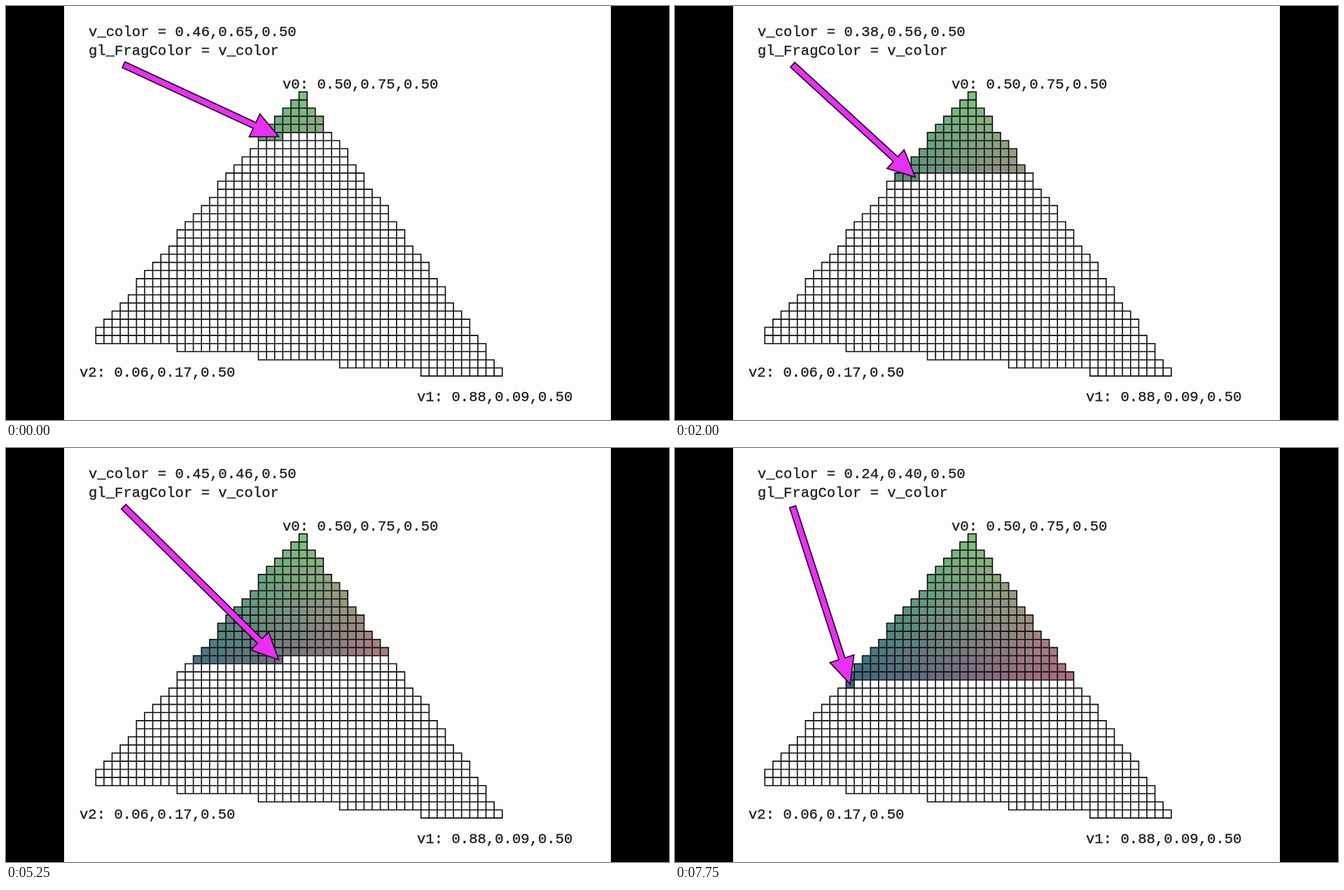
Write an HTML page with a canvas that moves like this. It is 947 px wide and 592 px high and loops after 8 s.

```html
<!DOCTYPE html>
<html lang="en">
<head>
<meta charset="utf-8">
<title>Varying interpolation</title>
<style>
  html, body { margin: 0; width: 100%; height: 100%; overflow: hidden; background: #000; }
  canvas { display: block; }
</style>
</head>
<body>
<canvas id="stage" width="947" height="592"></canvas>
<script>
const ctx = document.getElementById('stage').getContext('2d');

const LOOP = 8000;
const STEP = 250;
const CELL = 11.61;
const LEFT = 128.3;
const TOP = 122.8;
const ROWS = 35;
const ARROW_START = { x: 168, y: 84 };

// [step, index of the cell being shaded]
const PACE = [[0, 22], [5, 58], [12, 112], [16, 145], [21, 187], [25, 217], [31, 255]];

// Interpolate the vertex colours with barycentric weights.
function shade(col, row) {
  const dx = col + 0.5 - 25;
  const dy = row + 0.25;
  const a = (30 * dx + 25 * dy) / 1625;
  const b = (25 * dy - 35 * dx) / 1625;
  return [0.5025 + 0.378 * a - 0.4445 * b, 0.754 - 0.66 * a - 0.58 * b, 0.5];
}

function buildCells() {
  const cells = [];
  for (let row = 0; row < ROWS; row++) {
    const first = row <= 30 ? 25 - Math.ceil(row * 5 / 6) : (row - 30) * 10;
    const end = 26 + Math.floor(row * 5 / 7);
    for (let col = first; col < end; col++) {
      cells.push({ x: LEFT + col * CELL, y: TOP + row * CELL, color: shade(col, row) });
    }
  }
  return cells;
}

const cells = buildCells();

function cellIndexAt(step) {
  let k = 1;
  while (k < PACE.length - 1 && step > PACE[k][0]) k++;
  const [s0, i0] = PACE[k - 1];
  const [s1, i1] = PACE[k];
  return Math.round(i0 + (i1 - i0) * (step - s0) / (s1 - s0));
}

function drawGrid(current) {
  cells.forEach((cell, i) => {
    ctx.fillStyle = i <= current
      ? `rgb(${cell.color.map(v => Math.round(v * 255)).join(',')})`
      : '#fff';
    ctx.fillRect(cell.x, cell.y, CELL, CELL);
  });
  ctx.strokeStyle = '#0c0c0c';
  ctx.lineWidth = 1.6;
  ctx.beginPath();
  for (const cell of cells) ctx.rect(cell.x, cell.y, CELL, CELL);
  ctx.stroke();
}

function drawArrow(tipX, tipY) {
  const dx = tipX - ARROW_START.x;
  const dy = tipY - ARROW_START.y;
  const length = Math.hypot(dx, dy);
  const neck = length - 38;
  const half = 4.6;
  const headHalf = 18;

  ctx.save();
  ctx.translate(ARROW_START.x, ARROW_START.y);
  ctx.rotate(Math.atan2(dy, dx));
  ctx.beginPath();
  ctx.moveTo(0, -half);
  ctx.lineTo(neck, -half);
  ctx.lineTo(neck, -headHalf);
  ctx.lineTo(length, 0);
  ctx.lineTo(neck, headHalf);
  ctx.lineTo(neck, half);
  ctx.lineTo(0, half);
  ctx.closePath();
  ctx.fillStyle = '#ea2ff2';
  ctx.fill();
  ctx.strokeStyle = '#2a1230';
  ctx.lineWidth = 1.8;
  ctx.stroke();
  ctx.restore();
}

function label(text, x, y) {
  ctx.fillStyle = ctx.strokeStyle = '#1c1c1c';
  ctx.lineWidth = 0.3;
  ctx.fillText(text, x, y);
  ctx.strokeText(text, x, y);
}

function draw(time) {
  const current = cellIndexAt(Math.floor(time % LOOP / STEP));
  const cell = cells[current];

  ctx.fillStyle = '#000';
  ctx.fillRect(0, 0, 947, 592);
  ctx.fillStyle = '#fdfefb';
  ctx.fillRect(83, 0, 781, 592);

  drawGrid(current);
  drawArrow(cell.x + CELL / 2, cell.y + CELL / 2);

  ctx.font = '20.6px "Courier New", "Liberation Mono", monospace';
  label(`v_color = ${cell.color.map(v => v.toFixed(2)).join(',')}`, 118, 43);
  label('gl_FragColor = v_color', 118, 70);
  label('v0: 0.50,0.75,0.50', 395, 118);
  label('v2: 0.06,0.17,0.50', 105, 530);
  label('v1: 0.88,0.09,0.50', 587, 565);
}

const start = performance.now();
function tick() {
  draw(performance.now() - start);
  requestAnimationFrame(tick);
}
tick();
</script>
</body>
</html>
```
